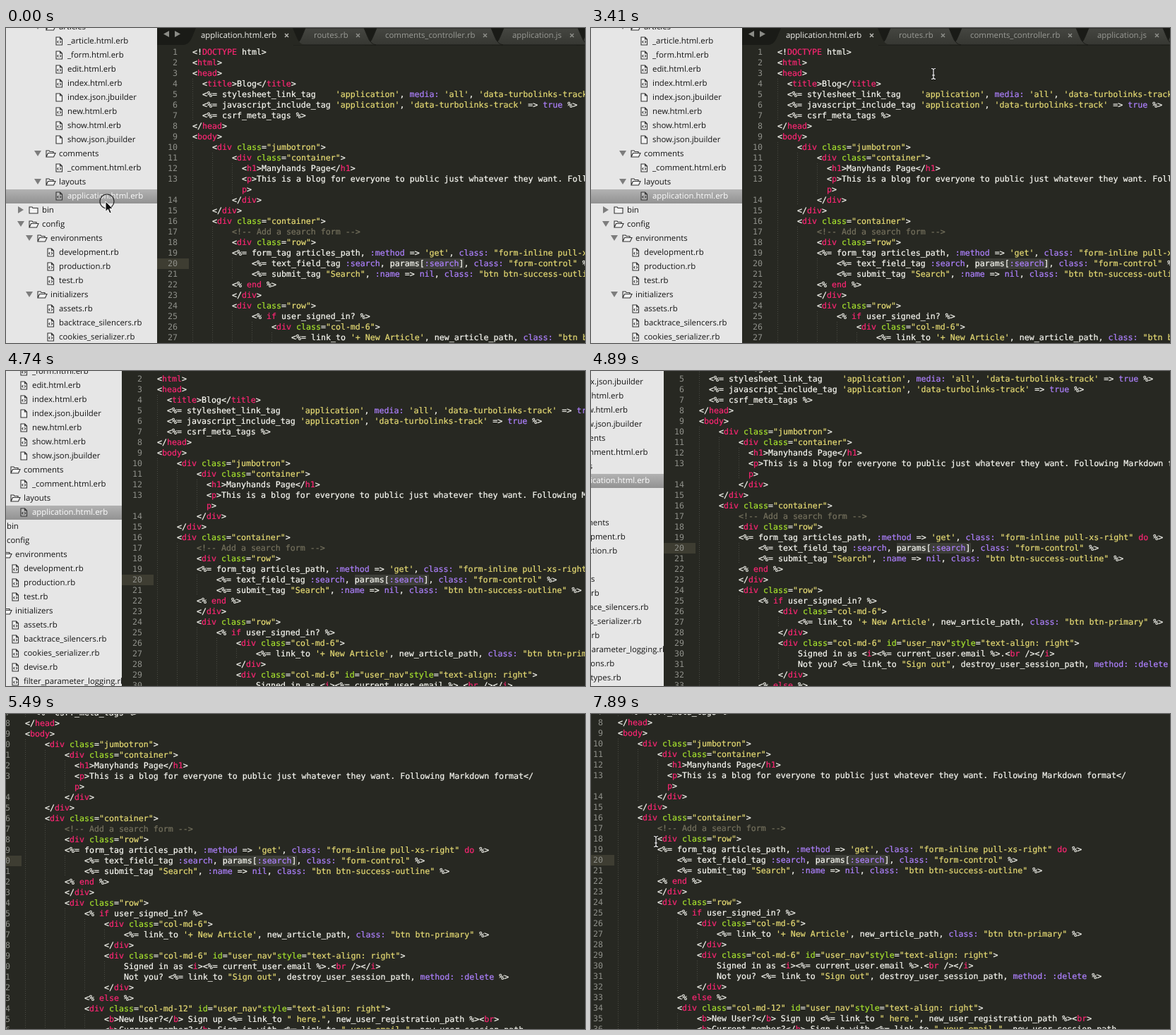
Animation, 820 px wide and 447 px high, one loop 8000 ms. Source, as an HTML page:

```html
<!DOCTYPE html>
<html lang="en">
<head>
<meta charset="utf-8">
<title>Editor walkthrough</title>
<style>
  html, body { margin: 0; width: 100%; height: 100%; overflow: hidden; background: #272822; }
  svg { display: block; width: 820px; height: 447px; }
  text { white-space: pre; fill: currentColor; text-rendering: geometricPrecision; }
  .code { font: 11.627px "DejaVu Sans Mono", monospace; color: #f8f8f2; stroke: currentColor; stroke-width: .22; }
  .ui { font: 11.4px "Open Sans", sans-serif; color: #141414; }
  .num { color: #8f908a; text-anchor: end; stroke: none; }
  .c { color: #75715e; }
  .s { color: #e6db74; }
  .g { color: #a6e22e; }
  .k { color: #f92672; }
  .n { color: #ae81ff; }
</style>
</head>
<body>
<svg id="stage" viewBox="0 0 820 447">
  <defs>
    <linearGradient id="row" x2="0" y2="1">
      <stop offset="0" stop-color="#b2b2b2"/><stop offset="1" stop-color="#929292"/>
    </linearGradient>
    <linearGradient id="tab" x2="0" y2="1">
      <stop offset="0" stop-color="#454641"/><stop offset="1" stop-color="#363732"/>
    </linearGradient>
  </defs>
  <g id="scene">
    <g id="side"><rect width="214" height="620" fill="#e6e6e6"/></g>
    <g id="editor">
      <rect x="214" width="900" height="620" fill="#272822"/>
      <rect id="gutter" x="214" y="327" width="45" height="15" fill="#3e3d32"/>
      <rect x="544" y="327" width="105" height="15" fill="#3d3e38"/>
    </g>
    <g id="tabs"><rect x="214" width="900" height="24" fill="#1a1b17"/></g>
  </g>
  <circle id="ring" r="10" fill="#fff" fill-opacity=".12" stroke="#222" stroke-width="1.2"/>
  <path id="arrow" d="M0 0V14.5L3.4 11.4L5.8 17L8.3 16L5.9 10.5H10.4Z" fill="#111" stroke="#fff" stroke-width="1"/>
  <g id="beam" fill="none">
    <path d="M-3 -7.5Q0 -7.5 0 -5.5Q0 -7.5 3 -7.5M0 -5.5V5.5M-3 7.5Q0 7.5 0 5.5Q0 7.5 3 7.5M-2 2H2" stroke="#111" stroke-width="2.6"/>
    <path d="M-3 -7.5Q0 -7.5 0 -5.5Q0 -7.5 3 -7.5M0 -5.5V5.5M-3 7.5Q0 7.5 0 5.5Q0 7.5 3 7.5M-2 2H2" stroke="#fff" stroke-width="1.2"/>
  </g>
</svg>
<script>
const LOOP = 8000;
const $ = id => document.getElementById(id);

function add(parent, tag, attrs = {}, text) {
  const el = document.createElementNS("http://www.w3.org/2000/svg", tag);
  for (const key in attrs) el.setAttribute(key, attrs[key]);
  if (text !== undefined) el.textContent = text;
  return parent.appendChild(el);
}

// ---- Code pane ----
const SOURCE = `<!DOCTYPE html>
<html>
<head>
  <title>Blog</title>
  <%= stylesheet_link_tag    'application', media: 'all', 'data-turbolinks-track' => true %>
  <%= javascript_include_tag 'application', 'data-turbolinks-track' => true %>
  <%= csrf_meta_tags %>
</head>
<body>
    <div class="jumbotron">
        <div class="container">
          <h1>Manyhands Page</h1>
          <p>This is a blog for everyone to public just whatever they want. Following Markdown format</
          p>
        </div>
    </div>
    <div class="container">
        <!-- Add a search form -->
        <div class="row">
        <%= form_tag articles_path, :method => 'get', class: "form-inline pull-xs-right" do %>
            <%= text_field_tag :search, params[:search], class: "form-control" %>
            <%= submit_tag "Search", :name => nil, class: "btn btn-success-outline" %>
        <% end %>
        </div>
        <div class="row">
            <% if user_signed_in? %>
                <div class="col-md-6">
                    <%= link_to '+ New Article', new_article_path, class: "btn btn-primary" %>
                </div>
                <div class="col-md-6" id="user_nav"style="text-align: right">
                    Signed in as <i><%= current_user.email %>.<br /></i>
                    Not you? <%= link_to "Sign out", destroy_user_session_path, method: :delete %>
                </div>
            <% else %>
            <div class="col-md-12" id="user_nav"style="text-align: right">
                <b>New User?</b> Sign up <%= link_to " here.", new_user_registration_path %><br>
                <b>Current member?</b> Sign in with <%= link_to " your email.", new_user_session_path`;

// Groups: comment, string, attribute, keyword or tag, symbol or constant
const TOKENS = /(?<c><!--.*?-->)|(?<s>"[^"]*"|'[^']*')|(?<g>\w+(?=="))|(?<k>(?<=<\/?!?)[a-zA-Z]\w*|\b(?:if|else|end|do)\b|^p(?=>))|(?<n>:\w+|\w+:|\b(?:true|nil)\b)/g;

function paintLine(line, x, y) {
  const el = add($("editor"), "text", { class: "code", x, y });
  let at = 0;
  for (const m of line.matchAll(TOKENS)) {
    if (m.index > at) add(el, "tspan", {}, line.slice(at, m.index));
    const kind = Object.keys(m.groups).find(k => m.groups[k] !== undefined);
    add(el, "tspan", { class: kind }, m[0]);
    at = m.index + m[0].length;
  }
  if (at < line.length) add(el, "tspan", {}, line.slice(at));
}

let number = 0;
SOURCE.split("\n").forEach((raw, i) => {
  const line = raw.trimStart(), indent = raw.length - line.length, y = 38 + 15 * i;
  for (let col = 0; col < indent; col += 4)
    add($("editor"), "path", { d: `M${264.5 + 7 * col} ${y - 11}v15`, stroke: "#4a4b44", "stroke-dasharray": "1 2" });
  if (line !== "p>") add($("editor"), "text", { class: "code num", x: 243, y }, ++number);
  paintLine(line, 264 + 7 * indent, y);
});

// ---- Tabs ----
function paintTab(label, left, right, x, active) {
  add($("tabs"), "path", {
    d: `M${left - 8} 24Q${left} 23 ${left + 4} 12L${left + 9} 0H${right - 9}L${right - 4} 12Q${right} 23 ${right + 8} 24Z`,
    fill: active ? "#272822" : "url(#tab)", stroke: active ? "none" : "#1c1d19"
  });
  add($("tabs"), "text", { class: "ui", x, y: 14, style: `color:${active ? "#f4f4f0" : "#999a95"}` }, label);
  add($("tabs"), "path", { d: `M${right - 20} 8l5 5m0 -5l-5 5`, stroke: active ? "#b5b5b0" : "#8c8d88", "stroke-width": 1.5 });
}
paintTab("", 816, 960, 840);
paintTab("application.js", 696, 819, 717);
paintTab("comments_controller.rb", 516, 696, 537);
paintTab("routes.rb", 415, 516, 436);
paintTab("application.html.erb", 260, 415, 276, true);
add($("tabs"), "path", { d: "M231 4v9l-8 -4.5zM239 4v9l8 -4.5z", fill: "#8b8c87" });

// ---- Sidebar: depth, kind (+ open, - closed, e code file, j plain file), label ----
const TREE = `3+articles
4e_article.html.erb
4e_form.html.erb
4eedit.html.erb
4eindex.html.erb
4jindex.json.jbuilder
4enew.html.erb
4eshow.html.erb
4jshow.json.jbuilder
3+comments
4e_comment.html.erb
3+layouts
4eapplication.html.erb
1-bin
1+config
2+environments
3edevelopment.rb
3eproduction.rb
3etest.rb
2+initializers
3eassets.rb
3ebacktrace_silencers.rb
3ecookies_serializer.rb
3edevise.rb
3efilter_parameter_logging.rb
3einflections.rb
3emime_types.rb
3esession_store.rb
3ewrap_parameters.rb`;

const ICONS = {
  "+": "M-6 4V-4.5H-2L-1 -3H4V-1M-6 4.5L-3.5 -1H7L4.5 4.5Z",
  "-": "M-6 4.5V-4.5H-2L-1 -3H6V4.5Z",
  e: "M-4 -5.5H1.5L4.5 -2.5V5.5H-4ZM1.5 -5.5V-2.5H4.5M-.7 -.5L-2.2 1.2L-.7 3M1.2 -.5L2.7 1.2L1.2 3",
  j: "M-4 -5.5H1.5L4.5 -2.5V5.5H-4ZM1.5 -5.5V-2.5H4.5"
};

TREE.split("\n").forEach((entry, i) => {
  const kind = entry[1], x = 39 + 12 * (entry[0] - 1), y = 20 * i - 2;
  const picked = entry.includes("application");
  if (picked) add($("side"), "rect", { y: y - 9, width: 214, height: 20, fill: "url(#row)" });
  if ("+-".includes(kind))
    add($("side"), "path", {
      d: kind === "+" ? `M${x - 23} ${y - 4}h10l-5 8z` : `M${x - 22} ${y - 5}v10l8 -5z`, fill: "#7d7d7d"
    });
  add($("side"), "path", {
    d: ICONS[kind], transform: `translate(${x} ${y + .5})`,
    fill: "#f6f6f6", "fill-opacity": picked ? .25 : .8, stroke: "#333", "stroke-width": 1.1
  });
  add($("side"), "text", { class: "ui", x: x + 12, y: y + 4, style: picked ? "color:#fff" : "" }, entry.slice(2));
});

// ---- Motion: each key holds until the next one ----
const PAN = [
  [0, 0, 0], [4450, -23, -13], [4600, -50, -38], [4750, -80, -63], [4890, -111, -83],
  [5040, -149, -101], [5190, -188, -114], [5340, -219, -122], [5490, -237, -126],
  [5640, -235, -127], [5790, -230, -127], [5940, -226, -127]
];
const POINTER = [
  [0, "arrow", 141, 246], [140, "arrow", 139, 247], [290, "arrow", 136, 248], [440, "arrow", 133, 249],
  [590, "arrow", 131, 249], [1630, "arrow", 128, 244], [1930, "arrow", 125, 238],
  [2970, "arrow", 90, 205], [3120, "arrow", 180, 150], [3270, "beam", 370, 95], [3410, "beam", 485, 65],
  [3560, "beam", 474, 43], [3710, "arrow", 460, 20], [3850, "arrow", 450, 4], [4000, ""],
  [6240, "arrow", 300, 210], [6390, "arrow", 282, 219], [6540, "arrow", 205, 160], [6690, "arrow", 95, 80],
  [6840, "arrow", 12, 45], [6990, "arrow", 40, 115], [7140, "beam", 105, 190], [7290, "beam", 98, 184],
  [7590, "beam", 94, 182], [7890, "beam", 92, 181]
];
const GLOW = [
  [0, 1], [1630, .7], [1780, .35], [1930, 0], [2230, .35], [2380, .7], [2520, 1],
  [2970, .7], [3120, .35], [3270, 0], [4150, .5], [4450, 1]
];
const RING = [[0, 1], [140, .7], [290, .4], [440, .15], [590, 0]];

const hold = (keys, t) => keys.findLast(key => key[0] <= t);
const place = (id, x, y) => $(id).setAttribute("transform", `translate(${x} ${y})`);

function draw(t) {
  const [, dx, dy] = hold(PAN, t);
  place("scene", dx, dy);
  $("gutter").setAttribute("opacity", hold(GLOW, t)[1]);

  const [, shape, x = 0, y = 0] = hold(POINTER, t);
  for (const id of ["arrow", "beam"]) {
    $(id).setAttribute("visibility", id === shape ? "visible" : "hidden");
    place(id, x, y);
  }
  $("ring").setAttribute("opacity", hold(RING, t)[1]);
  place("ring", x + 2, y);
}

const start = performance.now();
function tick() {
  draw((performance.now() - start) % LOOP);
  requestAnimationFrame(tick);
}
tick();
</script>
</body>
</html>
```
